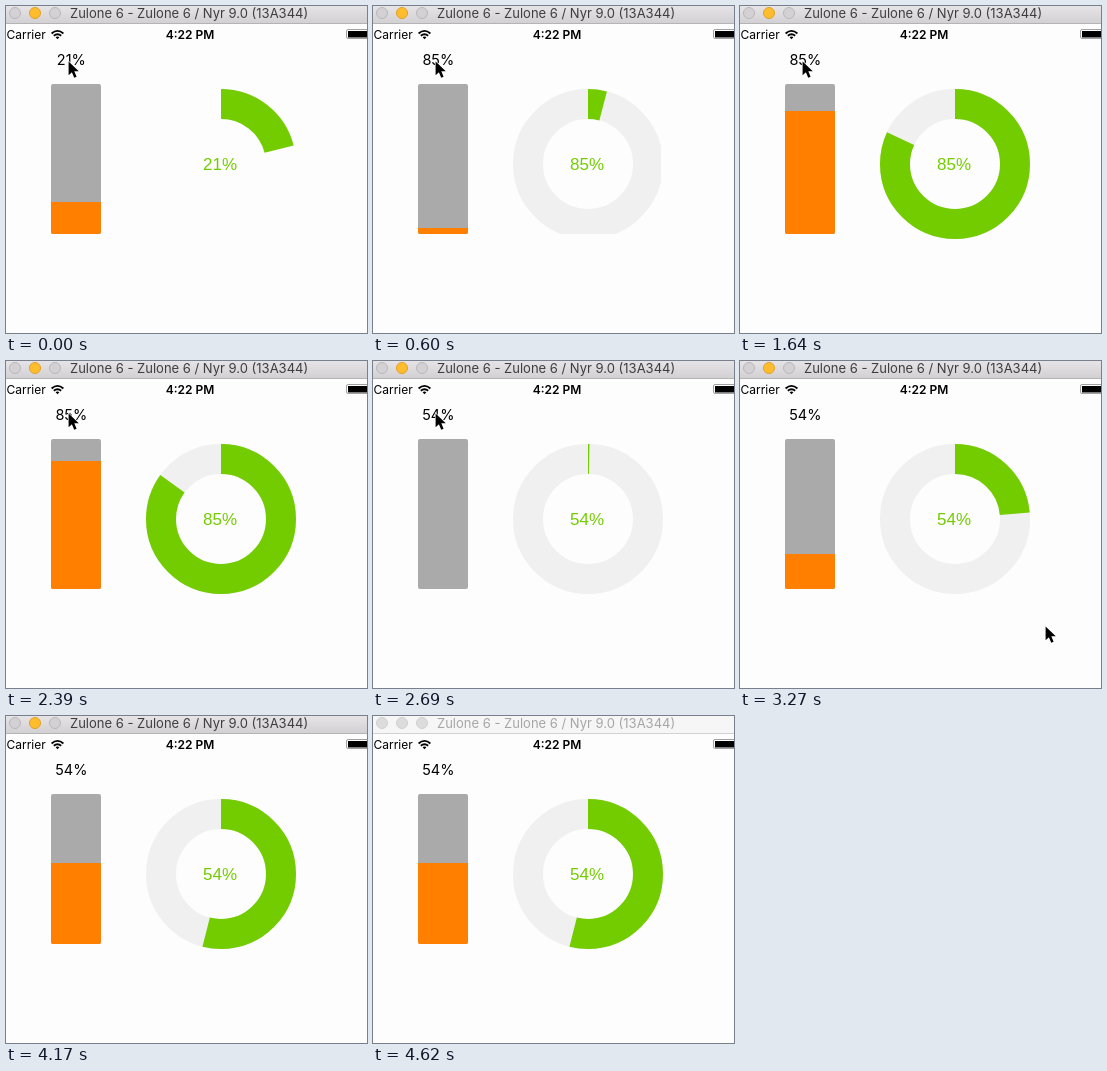
An HTML page that plays this animation: 361x327 px, repeating every 4720 ms.

```html
<!DOCTYPE html>
<html lang="en">
<head>
<meta charset="utf-8">
<title>Progress views</title>
<style>
html, body { margin: 0; width: 100%; height: 100%; overflow: hidden; background: #fdfdfd; }
svg { display: block; width: 361px; height: 327px; font-family: Inter, Roboto, sans-serif; }
#head { fill: url(#chrome); }
#edge { fill: #b4b4b4; }
#title { fill: #3e3e3e; font-size: 13px; }
.light { fill: #d3d1d3; stroke: #b9b7b9; }
.amber { fill: #ffbd2e; stroke: #e0a028; }
.idle #head { fill: #f6f6f6; }
.idle #edge { fill: #d2d2d2; }
.idle #title { fill: #a6a6a6; }
.idle .light { fill: #dcdcdc; stroke: #d0d0d0; }
.ring { fill: none; stroke-width: 30; }
#ringText { font: 17px "Liberation Sans", Arial, sans-serif; fill: #73cc00; }
</style>
</head>
<body>
<svg id="stage" viewBox="0 0 361 327">
  <defs>
    <linearGradient id="chrome" x2="0" y2="1">
      <stop stop-color="#e6e4e6"/><stop offset="1" stop-color="#d2d0d2"/>
    </linearGradient>
    <clipPath id="drawn"><rect id="drawnBox" width="361" height="327"/></clipPath>
    <clipPath id="barShape"><rect x="45" y="78" width="50" height="150" rx="2"/></clipPath>
  </defs>
  <rect width="361" height="327" fill="#fdfdfd"/>

  <rect id="head" width="361" height="17"/>
  <rect id="edge" y="17" width="361" height="1"/>
  <circle class="light" cx="9" cy="7" r="5.5"/>
  <circle class="light amber" cx="29" cy="7" r="5.5"/>
  <circle class="light" cx="49" cy="7" r="5.5"/>
  <text id="title" x="64" y="12">Zulone 6 - Zulone 6 / Nyr 9.0 (13A344)</text>

  <text x="0.5" y="33" font-size="12">Carrier</text>
  <g fill="none" stroke="#000" stroke-width="1.8">
    <path d="M45.6 27.5Q51.5 22.2 57.4 27.5M47.8 29.8Q51.5 26.6 55.2 29.8"/>
    <path d="M49.6 31.2Q51.5 29.7 53.4 31.2L51.5 33.2Z" fill="#000" stroke="none"/>
  </g>
  <text x="184" y="32.5" font-size="12" font-weight="600" text-anchor="middle">4:22 PM</text>
  <rect x="340.5" y="23.5" width="25" height="9" rx="1.5" fill="#fff" stroke="#a0a0a0"/>
  <rect x="342" y="25" width="22" height="6.5"/>

  <text id="barText" x="65.3" y="59" font-size="14.5" text-anchor="middle"></text>
  <g clip-path="url(#barShape)">
    <rect x="45" y="78" width="50" height="150" fill="#aaa"/>
    <rect id="fill" x="45" width="50" fill="#ff8000"/>
  </g>

  <g clip-path="url(#drawn)">
    <circle id="track" class="ring" cx="215" cy="158" r="60" stroke="#f0f0f0"/>
  </g>
  <circle id="arc" class="ring" cx="215" cy="158" r="60" stroke="#73cc00"
    pathLength="100" transform="rotate(-90 215 158)"/>
  <text id="ringText" x="214" y="164" text-anchor="middle"></text>

  <path id="cursor" d="M.6 1.4V15.3L3.9 12.2L6.2 17.7L8.6 16.7L6.3 11.3H10.8Z"
    stroke="#fff" stroke-width="1.2" paint-order="stroke"/>
</svg>
<script>
const LOOP = 4720;
const $ = id => document.getElementById(id);

// Eased share of the goal reached at each redraw of a run
const ease = [.006, .048, .137, .277, .437, .604, .763, .892, .964, .996, 1];
const runs = [
  { goal: 85, times: [450, 600, 750, 900, 1050, 1200, 1340, 1490, 1640, 1790, 1940] },
  { goal: 54, times: [2690, 2840, 2980, 3130, 3270, 3420, 3570, 3720, 3870, 4020, 4170] }
];
const moves = [[0, 62, 54], [2390, 62, 51], [2980, 95, 75], [3130, 294, 231],
  [3270, 305, 264], [3420, 328, 310], [3570, 400, 400]];

function progress(t) {
  const run = runs.findLast(r => t >= r.times[0]);
  if (!run) return { goal: 21, value: 21 };
  const step = run.times.findLastIndex(s => t >= s);
  return { goal: run.goal, value: run.goal * ease[step] };
}

function draw(t) {
  const { goal, value } = progress(t);
  const height = Math.round(value * 1.5);
  $("fill").setAttribute("y", 228 - height);
  $("fill").setAttribute("height", height);
  $("arc").setAttribute("stroke-dasharray", `${value} 200`);
  $("barText").textContent = $("ringText").textContent = goal + "%";

  // The track is uncovered in stages
  $("track").setAttribute("visibility", t < 450 ? "hidden" : "visible");
  $("drawnBox").setAttribute("width", t < 900 ? 288 : 361);
  $("drawnBox").setAttribute("height", t < 1200 ? 228 : 327);

  const [, x, y] = moves.findLast(m => t >= m[0]);
  $("cursor").setAttribute("transform", `translate(${x} ${y})`);
  $("stage").classList.toggle("idle", t >= 4620);
}

const start = performance.now();
function tick() {
  draw((performance.now() - start) % LOOP);
  requestAnimationFrame(tick);
}
tick();
</script>
</body>
</html>
```
